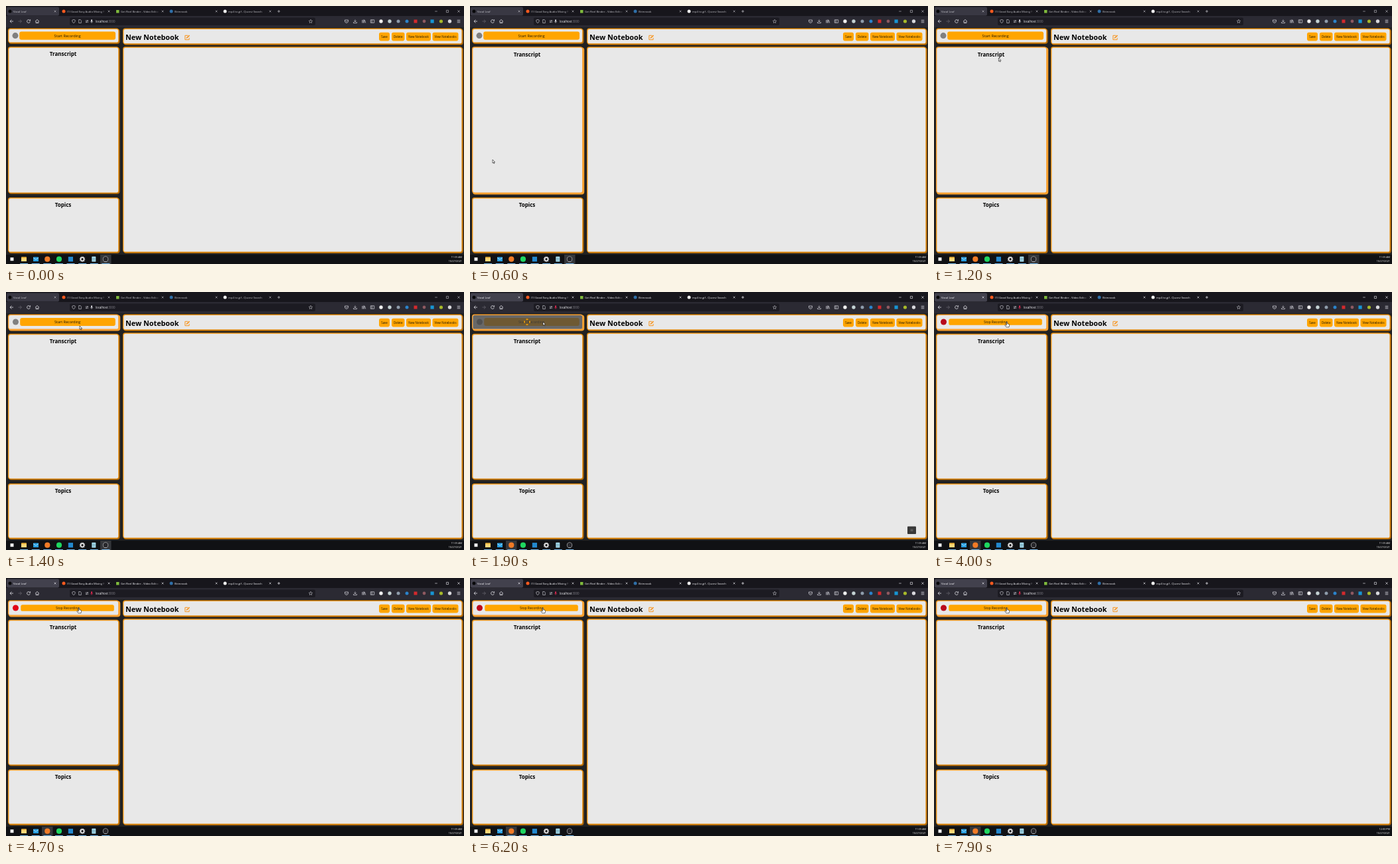
Animation, 690 px wide and 388 px high, one loop 8 s. Source, as an HTML page with a canvas:

```html
<!DOCTYPE html>
<html lang="en">
<head>
<meta charset="utf-8">
<title>Notebook recorder</title>
<style>
  html, body { margin: 0; width: 100%; height: 100%; overflow: hidden; background: #222; }
  canvas { display: block; width: 690px; height: 388px; }
</style>
</head>
<body>
<canvas id="stage"></canvas>
<script>
const W = 690, H = 388, LOOP = 8000;
const FOCUS = 1750, LOAD_START = 1800, LOAD_END = 2500, MINUTE = 7000;
const ORANGE = '#ffa500', PAPER = '#e8e8e8', ICON = '#dcdce2';
const canvas = document.getElementById('stage');
const ctx = canvas.getContext('2d');
const dpr = window.devicePixelRatio || 1;
canvas.width = W * dpr;
canvas.height = H * dpr;

const clamp = v => Math.max(0, Math.min(1, v));
const ease = v => { v = clamp(v); return v * v * (3 - 2 * v); };
const mix = (a, b, k) => a + (b - a) * k;
const mixRgb = (a, b, k) => `rgb(${a.map((v, i) => Math.round(mix(v, b[i], k)))})`;

function rect(x, y, w, h, color) {
  ctx.fillStyle = color;
  ctx.fillRect(x, y, w, h);
}
function round(x, y, w, h, r, color) {
  ctx.fillStyle = color;
  ctx.beginPath();
  ctx.roundRect(x, y, w, h, r);
  ctx.fill();
}
function disc(x, y, r, color) {
  ctx.fillStyle = color;
  ctx.beginPath();
  ctx.arc(x, y, r, 0, 7);
  ctx.fill();
}
function ring(x, y, r, color, width = 0.8, from = 0, to = 7) {
  ctx.strokeStyle = color;
  ctx.lineWidth = width;
  ctx.beginPath();
  ctx.arc(x, y, r, from, to);
  ctx.stroke();
}
// Strokes an SVG path placed at x, y.
function stroke(x, y, d, color = ICON, width = 0.8) {
  ctx.save();
  ctx.translate(x, y);
  ctx.strokeStyle = color;
  ctx.lineWidth = width;
  ctx.stroke(new Path2D(d));
  ctx.restore();
}
function text(s, x, y, size, color, align = 'left', weight = 400) {
  ctx.font = `${weight} ${size}px "Open Sans", "Noto Sans", sans-serif`;
  ctx.textAlign = align;
  ctx.textBaseline = 'alphabetic';
  ctx.fillStyle = color;
  ctx.fillText(s, x, y + size * 0.36);
}

const TABS = [
  ['Vocal Leaf', '#08080a'],
  ['(1) Good Easy Audio Mixing Prog', '#ff5a1f'],
  ['Get Reel Binder - Video Editor', '#7fba3c'],
  ['Brimnook', '#2f6fa8'],
  ['mp4 to gif - Quorvi Search', '#f1f1f1']
];

function drawTabs(focused) {
  const ink = focused ? '#f4f4f8' : '#c2c2c8';
  rect(0, 0, W, 16, '#17161c');
  round(1, 1.5, 79, 13, 2, focused ? '#42414d' : '#393843');
  TABS.forEach(([name, color], i) => {
    const x = i * 81;
    if (i === 2) rect(x + 4, 6, 4.5, 4.5, color);
    else disc(x + 6, 8, 2.5, color);
    ctx.save();
    ctx.beginPath();
    ctx.rect(x + 10, 0, 58, 16);
    ctx.clip();
    text(name, x + 11, 8.2, 4.2, ink);
    ctx.restore();
    if (i > 0) {
      const fade = ctx.createLinearGradient(x + 61, 0, x + 69, 0);
      fade.addColorStop(0, 'rgba(23,22,28,0)');
      fade.addColorStop(1, '#17161c');
      rect(x + 61, 3, 8, 10, fade);
    }
    stroke(x + 74, 8, 'M-1.4-1.4 1.4 1.4M1.4-1.4-1.4 1.4', ink, 0.6);
  });
  stroke(411, 8, 'M-2 0H2M0-2V2', ink, 0.7);
  stroke(648, 8, 'M-1.8 0H1.8', ink, 0.6);
  stroke(665, 8, 'M-1.6-1.6H1.6V1.6H-1.6Z', ink, 0.6);
  stroke(682, 8, 'M-1.7-1.7 1.7 1.7M1.7-1.7-1.7 1.7', ink, 0.6);
}

function drawToolbar(focused) {
  rect(0, 15, W, 17, '#2b2a33');
  round(96, 17.5, 370, 11.5, 2, '#1c1b22');
  stroke(8.5, 23, 'M2.5 0H-2.5M0-2.4-2.5 0 0 2.4');
  stroke(21, 23, 'M-2.5 0H2.5M0-2.4 2.5 0 0 2.4', '#65646c');
  ring(34, 23, 2.4, ICON, 0.8, 0.3, 5.6);
  stroke(34, 23, 'M2.6-2.8V-.8H.7');
  stroke(47, 23, 'M-2.8 0 0-2.6 2.8 0M-2-.5V2.5H2V-.5M0 2.5V.8');
  stroke(102, 23, 'M0-2.6 2.2-1.8C2.2 1 1.5 1.8 0 2.6-1.5 1.8-2.2 1-2.2-1.8Z', ICON, 0.6);
  stroke(111.5, 23, 'M-1.8-2.5H.6L1.8-1.3V2.5H-1.8Z', ICON, 0.6);
  stroke(122, 23, 'M-2.3-1H2.3M-2.3 1.2H2.3M.8-2V0M-.8.2V2.2', ICON, 0.6);
  const mic = focused ? '#e22850' : ICON;
  round(128.1, 20.2, 1.9, 3.6, 0.9, mic);
  stroke(129, 23, 'M-1.8 0C-1.8 2 1.8 2 1.8 0M0 1.5V2.8', mic, 0.5);
  text('localhost', 135, 23, 4.4, '#f4f4f8');
  const hostWidth = ctx.measureText('localhost').width;
  text(':3000', 135 + hostWidth, 23, 4.4, '#85848c');
  stroke(459, 23, 'M0-2.7 .8-.9 2.7-.7 1.3.6 1.7 2.5 0 1.5-1.7 2.5-1.3.6-2.7-.7-.8-.9Z', ICON, 0.5);

  stroke(513, 23, 'M-2.5-2H2.5V0C2 3.2-2 3.2-2.5 0ZM-1.2-.4 0 .8 1.2-.4', ICON, 0.7);
  stroke(526, 23, 'M0-2.5V1M-1.6-.6 0 1 1.6-.6M-2.5 1V2.6H2.5V1', ICON, 0.7);
  stroke(539, 23, 'M-2.2-2V2.5M-.8-2.5V2.5M.6-2.5V2.5M1.4-2 2.8 2.5', ICON, 0.7);
  stroke(552, 23, 'M-2.7-2.2H2.7V2.2H-2.7ZM-.7-2.2V2.2', ICON, 0.7);
  disc(565, 23, 2.7, '#f0f0f0');
  disc(578, 23, 2.7, '#c4d2d3');
  disc(591, 23, 2.5, '#8e9cab');
  disc(604, 23, 2.5, '#2b83ca');
  rect(614.5, 20.5, 5, 5, '#d4292d');
  disc(630, 23, 2.4, '#8e5960');
  rect(639.5, 20.4, 5.2, 5.2, '#1795d4');
  disc(655.5, 23, 2.6, '#a7b92a');
  disc(668.5, 23, 2.7, '#d8d8dc');
  stroke(682, 23, 'M-2.3-1.8H2.3M-2.3 0H2.3M-2.3 1.8H2.3', ICON, 0.7);
}

// Framed panel whose lower-right edge grows and brightens with hover.
function card(x, y, w, h, hover = 0) {
  const d = mix(1.5, 2.2, hover);
  round(x + 1, y + 1, w + d - 1, h + d - 1, 4, mixRgb([176, 104, 8], [250, 160, 46], hover));
  round(x, y, w, h, 3.6, mixRgb([236, 148, 22], [250, 160, 46], hover));
  round(x + 1.4, y + 1.4, w - 2.3, h - 2.3, 2.6, PAPER);
}

function button(label, x, w) {
  round(x, 39.8, w, 12.6, 2.8, ORANGE);
  text(label, x + w / 2, 46.3, 4.4, '#1a1408', 'center');
}

function drawSpinner(t) {
  const turn = (t - 1900) / 1000 * Math.PI * 2;
  for (let i = 0; i < 4; i++) {
    const a = turn + i * Math.PI / 2;
    ring(86, 45, 4, ORANGE, 1.6, a - 0.36, a + 0.36);
  }
}

function drawRecorder(t, hover) {
  const recording = t >= LOAD_END;
  card(3, 33.6, 167, 21.8 + hover, hover);
  const cy = 44.6 + hover * 0.4;
  const pulse = 0.5 + 0.5 * Math.cos((t - 3000) / 2000 * Math.PI * 2);
  const dot = recording ? mixRgb([184, 8, 28], [236, 0, 20], pulse) : '#808080';
  disc(14 + hover * 0.5, cy, 4.5, dot);
  if (recording) {
    round(22.3, cy - 4.8, 140.5, 9.6, 2.6, ORANGE);
    text('Stop Recording', 92.6, cy + 0.3, 5, '#1a1408', 'center');
  } else {
    round(20.2 + hover, cy - 6.1, 144.8 - hover * 1.2, 12.2, 3, ORANGE);
    text('Start Recording', 92.6, cy + 0.3, mix(5.6, 5.5, hover), '#1a1408', 'center');
  }
  if (t >= LOAD_START && !recording) {
    round(4.4, 35, 164.7, 20.5, 2.6, 'rgba(67,67,67,.77)');
    drawSpinner(t);
  }
}

function drawPage(t, hoverTop, hoverScript) {
  rect(0, 32, W, 343, '#222');
  drawRecorder(t, hoverTop);

  const top = 61.3 + hoverTop * 1.5;
  card(3, top, 167, 281.3 - top, hoverScript);
  text('Transcript', 86, top + 10.9 + hoverScript * 0.6, 8, '#000', 'center', 700);
  card(3, 288, 167, 82.4);
  text('Topics', 86, 298.7, 8, '#000', 'center', 700);

  card(176, 33.6, 511.3, 23.6);
  text('New Notebook', 180, 47.1, 10.8, '#000', 'left', 700);
  stroke(273, 47.3, 'M1-3H-3.2V3.4H3V.5', '#f7941d', 1);
  stroke(273, 47.3, 'M-1.2 1.2 3.4-3.2', '#f7941d', 1.7);
  button('Save', 562, 16);
  button('Delete', 581, 19.5);
  button('New Notebook', 603, 37);
  button('View Notebooks', 642.5, 39);
  card(176, 61.3, 511.3, 309.1);

  if (t >= LOAD_START && t < LOAD_END) {
    round(659, 352.5, 13, 11.5, 1, '#383838');
    rect(663.5, 356.5, 4, 3.5, '#5a5a5a');
  }
}

function drawTaskbar(t, focused) {
  rect(0, 374, W, 14, '#101114');
  rect(focused ? 54 : 142, 374, 16.5, 14, '#34363a');
  rect(6.5, 378.2, 5, 5, '#f2f2f2');
  round(23, 377.2, 8, 6.8, 0.7, '#e8b13a');
  rect(23, 379.2, 8, 4.8, '#ffd878');
  round(41, 377.4, 8, 6.6, 0.6, '#279ee0');
  stroke(45, 380.4, 'M-4-2 0 1 4-2', '#bfe6ff', 0.8);
  disc(62.3, 380.7, 4.1, '#f27b26');
  disc(80, 380.7, 4.1, '#1ed760');
  rect(93.8, 377.1, 7.2, 7.2, '#2389cf');
  ctx.setLineDash([1.1, 1.1]);
  ring(115, 380.7, 3.6, '#f2f2f2', 1.3);
  ctx.setLineDash([]);
  ring(115, 380.7, 2.4, '#f2f2f2', 1.4);
  round(129.3, 376.8, 6, 7.8, 0.6, '#a9dcec');
  stroke(132.3, 380.7, 'M-2-1.5H2M-2 0H2M-2 1.5H2', '#4b8194', 0.5);
  disc(150, 380.7, 4.2, '#d6d6d8');
  disc(150, 380.7, 3.6, '#27272b');
  for (let i = 1; i < 9; i++) rect(9.5 + i * 17.6 - 6, 387, 12, 1, '#76b9ed');
  text(t < MINUTE ? '11:59 AM' : '12:00 PM', 687, 377.7, 3.8, '#f2f2f2', 'right');
  text('10/27/2021', 687, 384, 3.8, '#f2f2f2', 'right');
}

// Pointer stops: time, x, y.
const STOPS = [[350, -8, 252], [600, 34, 231], [900, 48, 176], [1330, 111, 51], [1500, 111, 51], [1700, 110, 45]];
const HAND = new Path2D('M-.7 0Q0-.9.7 0V2.8L3 3.4Q3.7 3.6 3.6 4.5L3 7.8H-1.2L-3.1 5Q-3 3.6-1.8 4.3L-.7 5.2Z');
const ARROW = new Path2D('M0 0V5.2L1.2 4.1 2 6 2.9 5.6 2.1 3.8H3.7Z');

function drawPointer(t) {
  if (t < STOPS[0][0]) return;
  const last = STOPS.length - 1;
  let [, x, y] = STOPS[last];
  for (let i = 0; i < last; i++) {
    const a = STOPS[i], b = STOPS[i + 1];
    if (t >= a[0] && t < b[0]) {
      const k = ease((t - a[0]) / (b[0] - a[0]));
      x = mix(a[1], b[1], k);
      y = mix(a[2], b[2], k);
      break;
    }
  }
  const loading = t >= LOAD_START && t < LOAD_END;
  const shape = y < 50.5 && !loading ? HAND : ARROW;
  ctx.save();
  ctx.translate(x, y);
  ctx.fillStyle = '#fff';
  ctx.strokeStyle = '#111';
  ctx.lineWidth = 0.6;
  ctx.fill(shape);
  ctx.stroke(shape);
  ctx.restore();
}

function draw(t) {
  const focused = t >= FOCUS;
  const hoverTop = ease((t - 1250) / 150);
  const hoverScript = ease((t - 400) / 200) * (1 - ease((t - 1220) / 180));
  ctx.setTransform(dpr, 0, 0, dpr, 0, 0);
  drawTabs(focused);
  drawToolbar(focused);
  drawPage(t, hoverTop, hoverScript);
  drawTaskbar(t, focused);
  drawPointer(t);
}

const start = performance.now();
function tick() {
  draw((performance.now() - start) % LOOP);
  requestAnimationFrame(tick);
}
tick();
</script>
</body>
</html>
```
